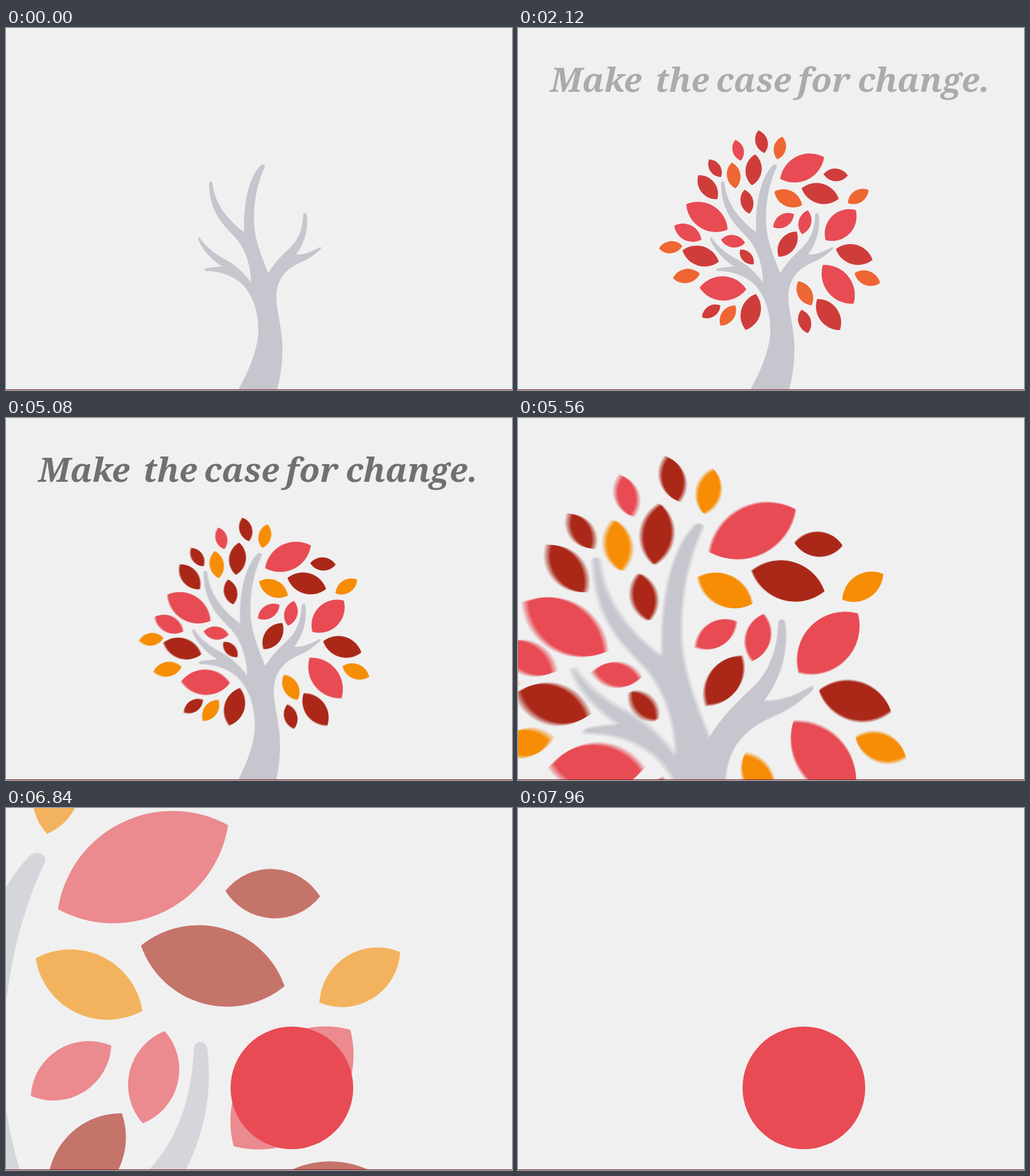
An HTML page with a canvas that plays this animation: 800x573 px, repeating every 8 s.

```html
<!DOCTYPE html>
<html lang="en">
<head>
<meta charset="utf-8">
<title>Make the case for change</title>
<style>
  html, body { margin: 0; width: 100%; height: 100%; overflow: hidden; background: #f0f0f0; }
  canvas { display: block; }
</style>
</head>
<body>
<canvas id="stage" width="800" height="573"></canvas>
<script>
const W = 800, H = 573, LOOP = 8000;
const BG = '#f0f0f0', RED = [232, 75, 83];
const stage = document.getElementById('stage').getContext('2d');
const layer = document.createElement('canvas');
layer.width = W;
layer.height = H;
const scene = layer.getContext('2d');

const tree = new Path2D(`M367 573 C384 543 399 507 399 478 C399 440 385 417 372 404
  C358 392 340 385 316 384.5 C313 384 313 381 316 380.5 C325 379 333 378 342 377.5
  C325 367 309 350 304 334 C303 331 306 331 307 333 C316 346 330 358 346 366
  C362 374 378 389 387.5 403 C387 380 381 352 362 331 C343 311 322 292 321 246
  C321 242 326 242 326.5 246 C329 276 350 304 376.5 323 C375 280 383 238 402 218
  C405 214 411 216 409 220 C397 245 392 275 392 301 C392 335 404 360 414.5 388
  C424 372 436 360 449 348 C461 337 469 320 470 296 C470 292 475 292 475.5 296
  C478 315 474 338 458.5 358.5 C472 359 484 354 496 347 C498 346 499 349 497 350.5
  C488 358 482 364 466 371 C440 382 427 400 427.5 428 C428 450 437 475 437 508
  C437 535 433 555 428.5 573 Z`);

// Each leaf is given by its two tips: x1, y1, x2, y2.
const foliage = [
  { color: RED, tips: [
    [414.5, 238.8, 484, 204.4], [266, 279, 331.5, 319], [247, 313, 290, 335],
    [321, 335, 359, 340], [287, 411, 361, 413.5], [458.1, 288.6, 449.1, 326.4],
    [403.4, 315.2, 436.3, 294.6], [482, 375, 530.5, 436.5], [343.5, 177, 352.5, 210]] },
  { color: RED, roundness: .576, tips: [[486.3, 335.7, 533.9, 288.1]] },
  { color: [171, 40, 24], tips: [
    [380, 162, 390, 198], [302, 208, 321, 236], [375, 200, 370, 249], [285, 233, 315, 271],
    [358, 256, 366, 294], [351, 351, 372.5, 374], [260, 352, 317.5, 370],
    [482.9, 231.3, 521.6, 233.6], [448.4, 253.7, 507.1, 270.3], [440.6, 322.3, 412, 362],
    [502.6, 350, 560.6, 367], [473, 429, 509, 478], [448, 446, 458.5, 483],
    [320, 439, 291, 458], [376, 421, 360, 478]] },
  { color: [246, 141, 4], tips: [
    [418, 172, 410, 208], [338, 213, 344, 254], [405.4, 258.9, 449, 280.4],
    [521.3, 277, 554.3, 256.3], [223, 349, 260, 345], [245, 396, 287.5, 389],
    [343.5, 439, 320, 471], [443, 401, 464, 439], [532, 388, 572.5, 403.8]] }
];

function leafShape([x1, y1, x2, y2], roundness = .611) {
  const r = Math.hypot(x2 - x1, y2 - y1) * roundness;
  return `M${x1} ${y1} A${r} ${r} 0 0 1 ${x2} ${y2} A${r} ${r} 0 0 1 ${x1} ${y1} Z `;
}
for (const group of foliage)
  group.path = new Path2D(group.tips.map(tip => leafShape(tip, group.roundness)).join(''));

const words = [['Make', 51], ['the', 217], ['case', 313], ['for', 442], ['change.', 537]];

const ramp = (t, from, to) => Math.min(1, Math.max(0, (t - from) / (to - from)));
const ease = (t, from, to) => (1 - Math.cos(Math.PI * ramp(t, from, to))) / 2;
const blend = (a, b, k) => `rgb(${a.map((v, i) => v + (b[i] - v) * k)})`;

function scaleAbout(c, k, x, y) {
  c.translate(x, y);
  c.scale(k, k);
  c.translate(-x, -y);
}

function paintTree(c, t) {
  c.fillStyle = BG;
  c.fillRect(0, 0, W, H);
  c.save();
  c.globalAlpha = 1 - ease(t, 6475, 7335);
  scaleAbout(c, 1 + 2.87 * ease(t, 4965, 6475), 530.3, 266.2);
  c.fillStyle = '#c5c6ce';
  c.fill(tree);
  // The crown pops out to 120 % and settles.
  scaleAbout(c, 1.2 * ease(t, 440, 760) - .2 * ease(t, 760, 1060), 400, 398);
  for (const { color, path } of foliage) {
    c.fillStyle = blend(RED, color, ramp(t, 1500, 3000));
    c.fill(path);
  }
  c.restore();
}

function paintTitle(c, t) {
  c.globalAlpha = ramp(t, 1500, 3000) * (1 - ramp(t, 4980, 5420));
  c.fillStyle = '#4a4a4a';
  c.font = 'italic bold 53px "Noto Serif", serif';
  for (const [word, x] of words) c.fillText(word, x, 101);
}

function paintEmblem(c, t) {
  c.globalAlpha = ramp(t, 6475, 6700);
  c.fillStyle = blend(RED, RED, 0);
  c.beginPath();
  c.arc(452, 443, 97, 0, 2 * Math.PI);
  c.fill();
}

function draw(t) {
  // Motion blur: average several moments while the view zooms.
  const samples = t > 4965 && t < 6475 ? 10 : 1;
  for (let i = 0; i < samples; i++) {
    paintTree(scene, t + 18 * ((i + .5) / samples - .5));
    stage.globalAlpha = 1 / (i + 1);
    stage.drawImage(layer, 0, 0);
  }
  paintTitle(stage, t);
  paintEmblem(stage, t);
  stage.globalAlpha = 1;
  stage.fillStyle = '#8e1f27';
  stage.fillRect(0, H - 1, W, 1);
}

// The picture advances in steps of 80 ms.
function stepped(t) {
  const base = t < 1560 ? 500 : 1560;
  return base + Math.floor((t - base) / 80) * 80;
}

const start = performance.now();
function tick() {
  draw(stepped((performance.now() - start) % LOOP));
  requestAnimationFrame(tick);
}
tick();
</script>
</body>
</html>
```
